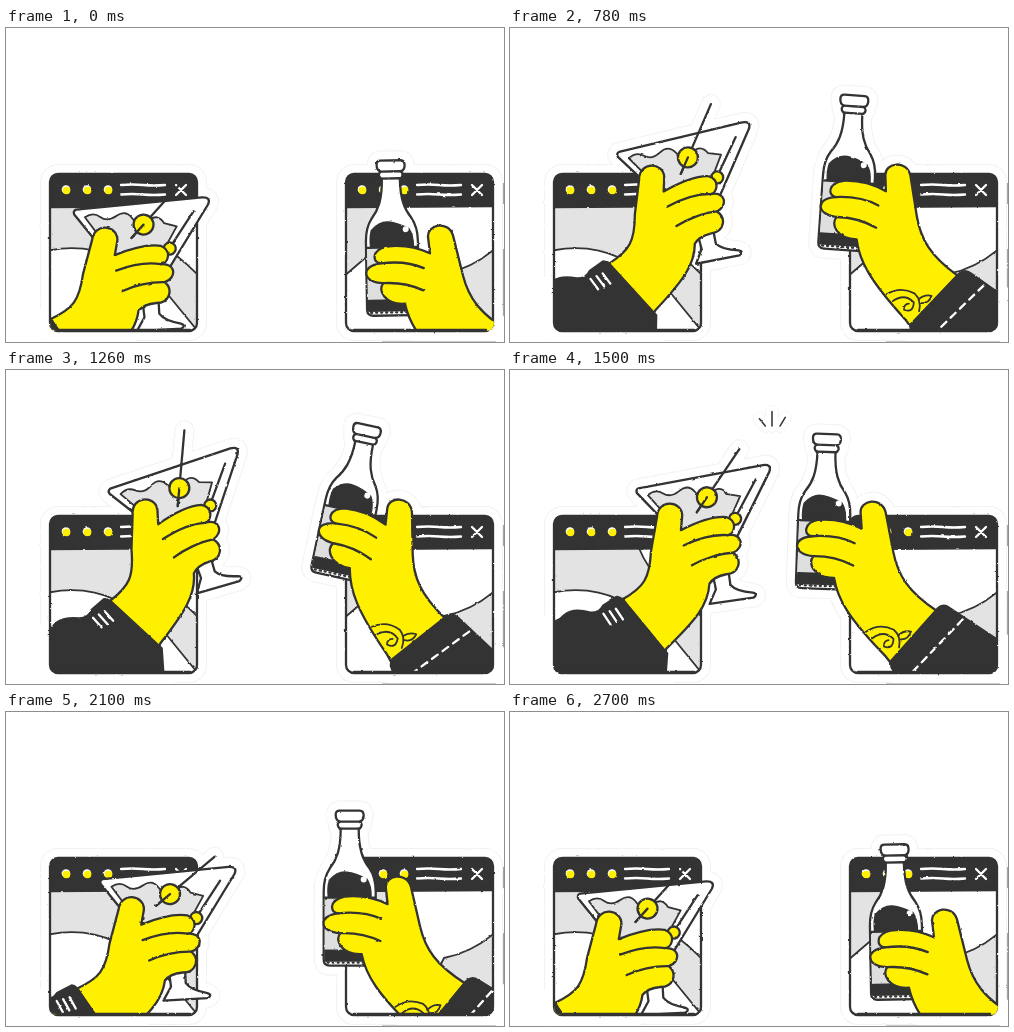
Write an HTML page that moves like this. It is 498 px wide and 314 px high and loops after 2.73 s.

```html
<!DOCTYPE html>
<html lang="en">
<head>
<meta charset="utf-8">
<title>Cheers</title>
<style>
  html, body { margin: 0; width: 100%; height: 100%; overflow: hidden; background: #fff; }
  svg { display: block; width: 498px; height: 314px; }
  path, circle, line, use { stroke-linecap: round; stroke-linejoin: round; }
  .ink, .paper, .sun, .dark, .grey { stroke: #333; stroke-width: 2.3; }
  .ink { fill: none; }
  .paper { fill: #fff; }
  .sun { fill: #fff000; }
  .dark { fill: #333; }
  .grey { fill: #e3e3e3; stroke-width: 1.8; }
  .thin { stroke-width: 1.8; }
  .chalk { fill: none; stroke: #fff; stroke-width: 2.3; }
  .fringe { fill: #f2f2f2; stroke: #f2f2f2; stroke-width: 20; }
  .border { fill: #fff; stroke: #fff; stroke-width: 18; }
</style>
</head>
<body>
<svg viewBox="0 0 498 314">
  <defs>
    <filter id="rough" filterUnits="userSpaceOnUse" x="0" y="0" width="498" height="314" color-interpolation-filters="sRGB">
      <feTurbulence id="noise" type="fractalNoise" baseFrequency=".22" numOctaves="2" seed="1"/>
      <feDisplacementMap in="SourceGraphic" scale="2" xChannelSelector="R" yChannelSelector="G"/>
    </filter>
    <clipPath id="leftCut"><path d="M44-10H330V303H52Q44 303 44 294Z"/></clipPath>
    <clipPath id="rightCut"><path d="M170-10H488V294Q488 303 480 303H170Z"/></clipPath>
    <clipPath id="leftEdge"><path d="M34-10H330V313H44Q34 313 34 303Z"/></clipPath>
    <clipPath id="rightEdge"><path d="M170-10H498V313H170Z"/></clipPath>
    <clipPath id="pane"><rect x="44" y="146" width="147" height="157" rx="8"/></clipPath>

    <rect id="frame" x="44" y="146" width="147" height="157" rx="8"/>
    <g id="dot"><circle cx="60" cy="161.500" r="4.300" fill="#fff"/><circle cx="60.500" cy="162.500" r="3.800" fill="#fff000"/></g>
    <g id="bar">
      <path class="dark" d="M45 179V154Q45 147 52 147H183Q190 147 190 154V178Z"/>
      <use href="#dot"/><use href="#dot" x="21"/><use href="#dot" x="42"/>
      <path class="chalk" d="M115 157q11-1 22 0t22 0M115 166.500q11-1 22 0t22 0M170 157l10 10M180 157l-10 10"/>
    </g>

    <path id="lHand" d="M131 145C130 127 154 126 156 141L156 156C172 146 188 139 200 139C212 142 210 155 203 157C218 153 221 168 210 174C220 180 218 194 205 196C198 198 192 201 189 207C190 228 178 245 152 275L130 320L80 260L104 230C124 216 129 207 128 180Z"/>
    <path id="lSleeve" d="M98 228Q103 228 108 234L153 280L154 345H10V264Q40 262 47 251Q55 243 72 246Q82 246 85 238Z"/>
    <path id="cup" d="M110 118L232 84Q241 82 239 90L203 182L186 190L109 123Q107 120 110 118Z"/>
    <path id="foot" d="M188 186L196 212L191 227L234 217Q239 213 233 212Q216 212 210 206L203 176Z"/>
    <line id="stick" y1="-58" y2="18"/>
    <circle id="olive" cx="179" cy="121" r="10"/>

    <path id="rHand" d="M373 156C360 148 346 144 331 144C314 146 315 159 323 160C302 160 302 177 323 180C316 186 322 202 342 203C344 225 354 245 388 285L412 320L460 260L442 243C415 222 406 205 403 182L398 141C395 125 373 127 373 140Z"/>
    <path id="rSleeve" d="M393 290L443 241Q449 236 455 241L524 294V350H420L393 296Z"/>
    <path id="bottle" transform="translate(345 60) rotate(6)" d="M-14 3Q-14-1-10-1H10Q14-1 14 4Q14 9 10 10Q14 13 10 17H9C9 38 13 48 20 57Q26 66 26 80V148Q26 154 20 154H-20Q-26 154-26 148V80Q-26 66-20 57C-13 48-9 38-9 17H-10Q-14 13-10 10Q-14 9-14 3Z"/>

    <g id="lShape">
      <use href="#frame"/>
      <g class="left">
        <use href="#lHand"/><use href="#lSleeve"/><use href="#cup"/><use href="#foot"/>
        <g class="pick"><use href="#stick"/></g>
      </g>
    </g>
    <g id="rShape">
      <use href="#frame" x="296"/>
      <g class="right"><use href="#rHand"/><use href="#rSleeve"/><use href="#bottle"/></g>
    </g>
    <path id="rays" d="M262 31V53M243 42L252 53M282 40L274 53"/>
  </defs>

  <g fill="#a5a5a5">
    <rect x="496" y="155" width="2" height="21"/>
    <rect x="496" y="221" width="2" height="73"/>
    <rect x="376" y="313" width="114" height="1" fill="#ccc"/>
  </g>

  <g filter="url(#rough)">
    <g clip-path="url(#leftEdge)"><use href="#lShape" class="fringe"/><use href="#lShape" class="border"/></g>
    <g clip-path="url(#rightEdge)"><use href="#rShape" class="fringe"/><use href="#rShape" class="border"/></g>
    <g id="spark">
      <use href="#rays" class="fringe"/><use href="#rays" class="border"/><use href="#rays" class="ink"/>
    </g>

    <g clip-path="url(#pane)">
      <path fill="#fff" d="M44 146h147v157H44z"/>
      <path class="grey" d="M40 223Q78 215 110 230L152 212Q138 200 128 176H40Z"/>
      <path class="grey" d="M150 214Q172 226 195 250V307L159 263L140 240Z"/>
    </g>
    <use href="#frame" class="ink"/>
    <use href="#bar"/>

    <g transform="translate(296)" clip-path="url(#pane)">
      <path fill="#fff" d="M44 146h147v157H44z"/>
      <path class="grey" d="M40 250L69 225Q86 207 86 176H40Z"/>
      <path class="grey" d="M196 218Q172 240 142 246L110 310H196Z"/>
    </g>
    <use href="#frame" class="ink" x="296"/>
    <use href="#bar" x="296"/>

    <g clip-path="url(#leftCut)">
      <g class="left">
        <use href="#foot" class="paper"/>
        <use href="#cup" class="paper"/>
        <path class="grey" d="M120 124Q127 117 135 121T151 117T167 117T183 116T199 116L212 117L194 170L150 152Z"/>
        <path class="ink" d="M226 99L206 146"/>
        <circle class="sun" cx="209" cy="140" r="6"/>
        <g class="pick"><use href="#stick" class="ink"/></g>
        <use href="#olive" class="sun"/>
        <g class="pick"><path class="ink" d="M0 0V18"/></g>
        <use href="#lHand" class="sun"/>
        <path class="ink" d="M203 157C188 157 172 164 160 171M210 174C196 176 180 183 170 190"/>
        <use href="#lSleeve" class="dark"/>
        <path class="chalk" d="M86 246l8 10m-2-13l8 10m-2-13l8 10"/>
      </g>
    </g>
    <path class="ink" d="M52 302H184"/>

    <g clip-path="url(#rightCut)">
      <g class="right">
        <use href="#bottle" class="paper"/>
        <g transform="translate(345 60) rotate(6)">
          <path class="ink" d="M-10 10H10M-9 17H9"/>
          <path class="dark" d="M-20 69Q-12 60-3 61T17 68Q21 74 21 85H-21Q-22 76-20 69Z"/>
          <path fill="#dedede" d="M-25 86H25V138H-25Z"/>
          <path class="ink" d="M-25 86H25V138"/>
          <path class="dark" d="M-24 139H24V149H-24Z"/>
          <path class="ink" stroke-dasharray="1 4" d="M-22 151H22"/>
          <circle cx="14" cy="68" r="3" fill="#fff"/>
        </g>
        <use href="#rHand" class="sun"/>
        <path class="ink" d="M323 160C342 160 355 164 365 170M323 180C340 181 352 186 362 192"/>
        <path class="ink thin" d="M370 259Q384 251 398 259Q405 266 402 277M376 266Q388 258 397 268Q396 279 387 275a5 5 0 0 1 5-6M402 265Q408 260 415 262Q412 270 404 269"/>
        <use href="#rSleeve" class="dark"/>
        <path class="chalk" stroke-dasharray="7 6" d="M414 302L468 253"/>
      </g>
    </g>
    <path class="ink" d="M348 302H480"/>
  </g>
</svg>
<script>
const LOOP = 2730, STEP = 60;

// Each hand rests at low; the rest are offsets: thumb x, thumb y, tilt, pick tilt
const left = {
  low: [99, 202, 10, 42], lean: [23, 26, 18, 23], up: [43, -69, -10, -22],
  recoil: [-5, -1, -3, -15], hit: [17, 3, 5, 14], drop: [5, 20, 5, 19]
};
const right = {
  low: [433, 200, -7], lean: [-20, 25, -20], up: [-48, -68, 7],
  recoil: [9, 0, 6], hit: [-23, 2, -4], drop: [-18, 1, -2.5]
};

const noise = document.getElementById('noise');
const spark = document.getElementById('spark');

function ease(t, from, to) {
  const p = Math.min(1, Math.max(0, (t - from) / (to - from)));
  return p * p * (3 - 2 * p);
}

// Rises during a..b, holds, falls during c..d
const hold = (t, a, b, c, d) => ease(t, a, b) - ease(t, c, d);

const weights = t => ({
  low: 1,
  lean: hold(t, 60, 480, 480, 840),
  up: hold(t, 480, 840, 1980, 2220),
  recoil: hold(t, 1020, 1200, 1320, 1440) + .6 * hold(t, 1560, 1680, 1680, 1920),
  hit: hold(t, 1380, 1500, 1500, 1620),
  drop: hold(t, 1980, 2100, 2100, 2220)
});

const blend = (hand, w) => hand.low.map((_, i) =>
  Object.keys(w).reduce((sum, k) => sum + hand[k][i] * w[k], 0));

function place(selector, value) {
  document.querySelectorAll(selector).forEach(el => el.setAttribute('transform', value));
}

function draw(t) {
  const w = weights(t);
  const [lx, ly, la, pick] = blend(left, w);
  const [rx, ry, ra] = blend(right, w);
  place('.left', `translate(${lx} ${ly}) rotate(${la}) translate(-142 -133)`);
  place('.pick', `translate(179 121) rotate(${pick - la})`);
  place('.right', `translate(${rx} ${ry}) rotate(${ra}) translate(-385 -132)`);

  const grow = .6 + .4 * ease(t, 1440, 1680);
  spark.setAttribute('visibility', t >= 1500 && t < 1860 ? 'visible' : 'hidden');
  spark.setAttribute('transform', `translate(262 62) scale(${grow}) translate(-262 -62)`);
  noise.setAttribute('seed', 1 + Math.floor(t / 120) % 4);
}

let last = -1;
function tick() {
  const t = Math.floor(performance.now() % LOOP / STEP) * STEP;
  if (t !== last) draw(last = t);
  requestAnimationFrame(tick);
}
tick();
</script>
</body>
</html>
```
